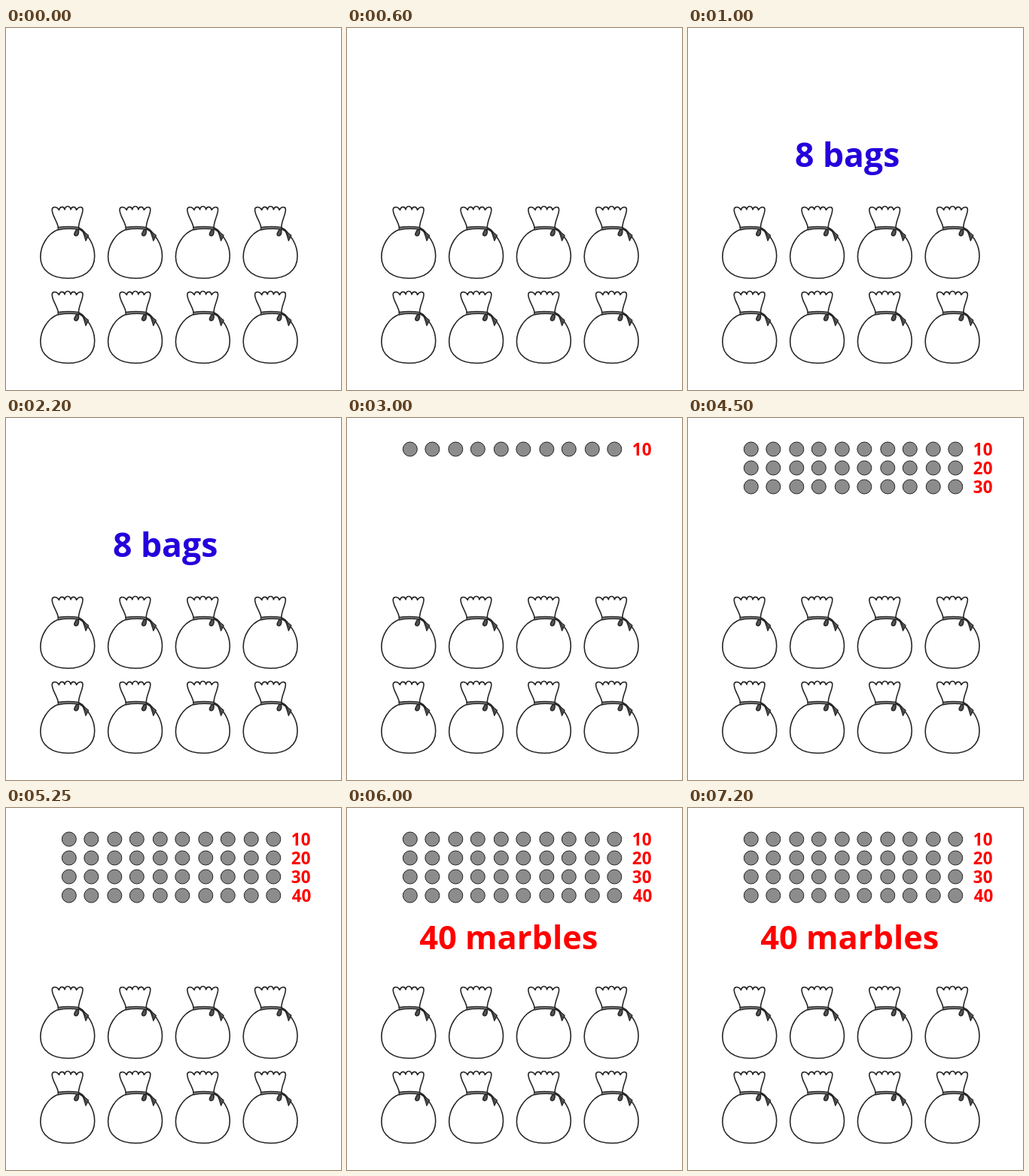
An HTML page for the animation above (8 s loop, 445 by 482 pixels).

```html
<!DOCTYPE html>
<html lang="en">
<head>
<meta charset="utf-8">
<title>Bags and marbles</title>
<style>
  html, body { margin: 0; width: 100%; height: 100%; overflow: hidden; background: #fff; }
  svg { display: block; width: 100%; height: 100%; }
  text { font-family: "Open Sans", "Noto Sans", sans-serif; font-weight: 700; }
  .count { font-size: 22.5px; fill: #f00; }
  .marble { fill: #8c8c8c; stroke: #222; stroke-width: 1; }
</style>
</head>
<body>
<svg id="stage" viewBox="0 0 445 482">
  <defs>
    <g id="bag" fill="none" stroke="#262626" stroke-width="1.6" stroke-linejoin="round" stroke-linecap="round">
      <path d="M24.5 29C23 20 16 13 16.200 5C16.500 1 22 .2 25.500 5.500C26.500 .5 32 .2 33 5C34 -.8 40 -.8 41 5C42 .2 47.500 .5 48.500 5.500C52 .2 57 1 57 5C57 12 52 19 51.500 28"/>
      <path d="M24.500 31.500C10 37 .8 53 .8 68C.8 87 17 96.500 37 96.500C57 96.500 72.700 87 72.700 67C72.700 52 64 37 52 31"/>
      <path d="M24 28.500Q38 26.500 51.500 28.500L52 31.500Q38 29.500 24.500 32Z" fill="#777" stroke-width="1.200"/>
      <path d="M51.500 29Q56 31 59 35" stroke-width="2"/>
      <path d="M48.500 32Q52 31 51.500 35Q51 39.500 48 40Q45 39.500 46 36.500Q47 34 48.500 32Z" fill="#555" stroke-width="1.500"/>
      <path d="M56.500 33L64.500 39.500L61 46.500Q59 39 56.500 33Z" fill="#666" stroke-width="1.300"/>
      <path d="M57.500 34L62.500 43" stroke-width="1"/>
    </g>
  </defs>
  <g id="bags"></g>
  <g id="rows"></g>
  <text id="bagLabel" x="142" y="185" font-size="44.500" fill="#2400dc">8 bags</text>
  <text id="marbleLabel" x="96.200" y="188.300" font-size="43.400" fill="#f00">40 marbles</text>
</svg>
<script>
const LOOP = 8000;
const ROWS_START = 3000;
const ROW_STEP = 750;
const ROW_COUNT = 4;

const byId = id => document.getElementById(id);

function add(parent, tag, attrs, text) {
  const el = document.createElementNS("http://www.w3.org/2000/svg", tag);
  for (const key in attrs) el.setAttribute(key, attrs[key]);
  if (text) el.textContent = text;
  parent.appendChild(el);
  return el;
}

for (let i = 0; i < 8; i++) {
  add(byId("bags"), "use", {
    href: "#bag",
    x: 45 + (i % 4) * 89.8,
    y: 236.8 + Math.floor(i / 4) * 113
  });
}

// Marbles sit in pairs, with a slightly wider gap between pairs.
function makeRow(row) {
  const group = add(byId("rows"), "g", {});
  const y = 41.5 + row * 25;
  for (let i = 0; i < 10; i++) {
    const cx = 83.8 + Math.floor(i / 2) * 60.5 + (i % 2) * 29.5;
    add(group, "circle", { class: "marble", cx, cy: y, r: 9.5 });
  }
  add(group, "text", { class: "count", x: row === 3 ? 379.7 : 378.8, y: y + 8 }, String((row + 1) * 10));
  return group;
}

const rows = Array.from({ length: ROW_COUNT }, (_, i) => makeRow(i));

function show(el, visible) {
  el.setAttribute("visibility", visible ? "visible" : "hidden");
}

function draw(now) {
  const t = now % LOOP;
  show(byId("bagLabel"), t >= 1000 && t < ROWS_START);
  rows.forEach((row, i) => show(row, t >= ROWS_START + i * ROW_STEP));
  show(byId("marbleLabel"), t >= ROWS_START + ROW_COUNT * ROW_STEP);
}

let start;
function tick(now) {
  start ??= now;
  draw(now - start);
  requestAnimationFrame(tick);
}
draw(0);
requestAnimationFrame(tick);
</script>
</body>
</html>
```
